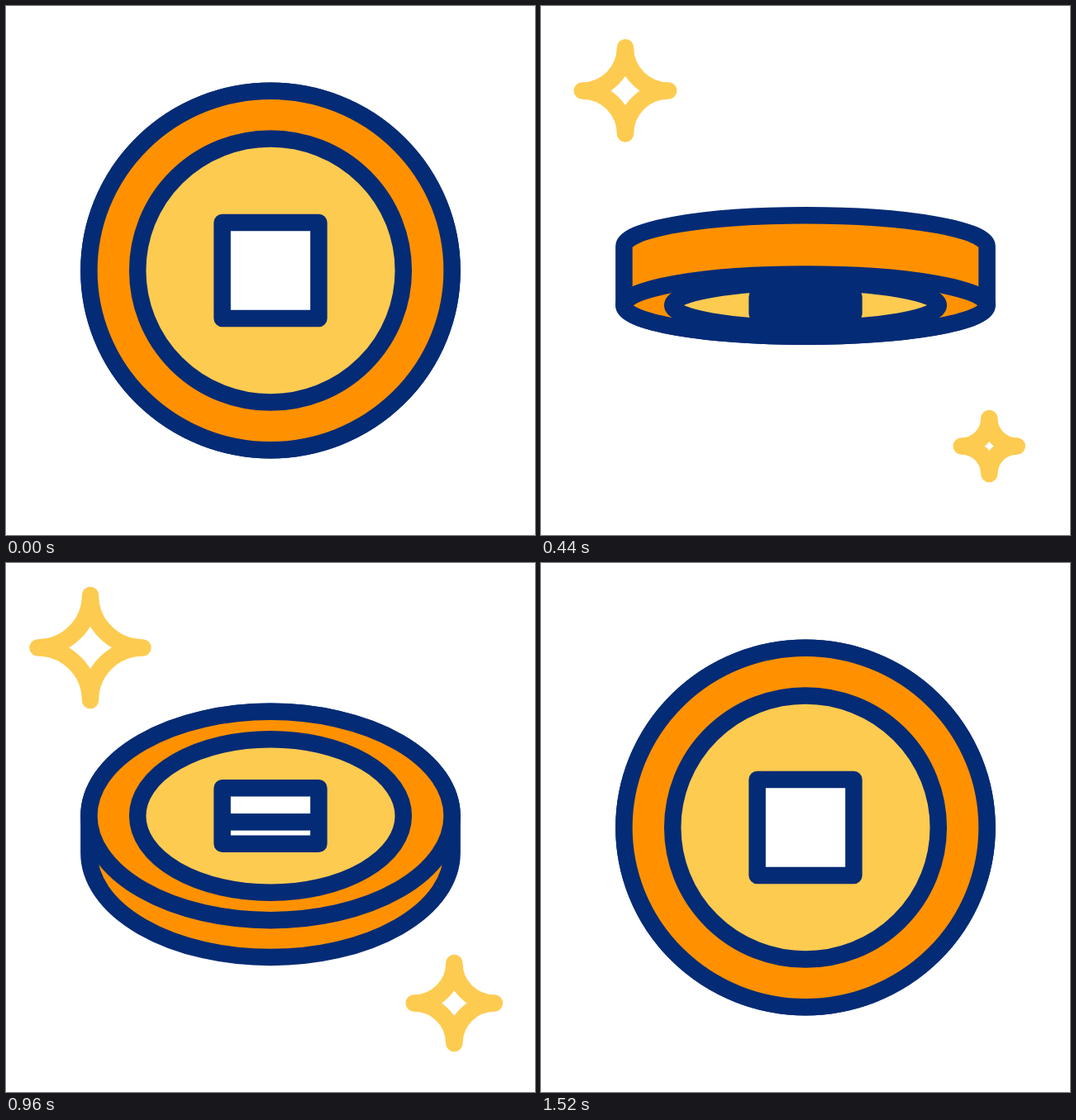
An HTML page with a canvas for the animation above (1900 ms loop, 640 by 640 pixels).

```html
<!DOCTYPE html>
<html lang="en">
<head>
<meta charset="utf-8">
<title>Spinning coin</title>
<style>
  html, body { margin: 0; width: 100%; height: 100%; overflow: hidden; background: #fff; }
  canvas { display: block; width: 100vw; height: 100vh; }
</style>
</head>
<body>
<canvas width="640" height="640"></canvas>
<script>
const ctx = document.querySelector('canvas').getContext('2d');
const NAVY = '#042b75', ORANGE = '#ff9100', YELLOW = '#fdcb50';
const LOOP = 1900, STEP = 20, CX = 320;
const RX = 219.6, RY = 217.2, INNER_RX = 160.8, INNER_RY = 159.6, HOLE = 58.4;

// Centres of the upper and lower rims: [time, upper y, lower y, openness]
const POSES = [
  [0, 320, 320, 1],
  [380, 283.8, 367.7, 0],
  [780, 330.4, 330.4, 1],
  [1100, 287, 366.7, 0],
  [1520, 320, 320, 1],
];
// Sparkle reach: [time, radius]
const SPARKLE = [[70, 0], [280, 67], [560, 41], [1040, 68], [1250, 0]];

const lerp = (a, b, u) => a + (b - a) * u;

function bezier(x1, y1, x2, y2, x) {
  const at = (a, b, s) => 3 * (1 - s) * (1 - s) * s * a + 3 * (1 - s) * s * s * b + s * s * s;
  let lo = 0, hi = 1;
  for (let i = 0; i < 24; i++) {
    const mid = (lo + hi) / 2;
    if (at(x1, x2, mid) < x) lo = mid; else hi = mid;
  }
  return at(y1, y2, lo);
}

function paint(fill, stroke) {
  if (fill) { ctx.fillStyle = fill; ctx.fill(); }
  ctx.strokeStyle = stroke;
  ctx.stroke();
}

function disc(y, rx, ry, fill) {
  ctx.beginPath();
  ctx.ellipse(CX, y, rx, ry, 0, 0, Math.PI * 2);
  paint(fill, NAVY);
}

function coin(t) {
  const time = Math.min(t, 1520);
  let i = 0;
  while (i < 3 && time >= POSES[i + 1][0]) i++;
  const a = POSES[i], b = POSES[i + 1];
  const u = (time - a[0]) / (b[0] - a[0]);
  const top = lerp(a[1], b[1], u), bottom = lerp(a[2], b[2], u);
  const open = bezier(.167, .13, i < 2 ? .66 : .6, 1, lerp(a[3], b[3], u));
  const k = Math.max(open, .001);
  const face = i % 2 ? bottom : top;

  ctx.beginPath();
  ctx.ellipse(CX, top, RX, RY * k, 0, Math.PI, Math.PI * 2);
  ctx.ellipse(CX, bottom, RX, RY * k, 0, 0, Math.PI);
  ctx.closePath();
  paint(ORANGE, NAVY);

  disc(face, RX, RY * k, ORANGE);
  disc(face, INNER_RX, INNER_RY * k, YELLOW);

  const h = 58 * k;
  ctx.beginPath();
  ctx.rect(CX - HOLE, face - h, HOLE * 2, h * 2);
  ctx.fillStyle = '#fff';
  ctx.fill();
  if (i === 2) {
    // far edge seen through the hole
    ctx.save();
    ctx.clip();
    ctx.fillStyle = NAVY;
    ctx.fillRect(CX - HOLE, face - h + 73 * u - 10.25, HOLE * 2, 20.5);
    ctx.restore();
  }
  ctx.beginPath();
  ctx.rect(CX - HOLE, face - h, HOLE * 2, h * 2);
  paint(null, NAVY);
}

function sparkle(x, y, t) {
  const i = SPARKLE.findIndex(([at], n) => n && t < at) - 1;
  if (i < 0 || t <= SPARKLE[0][0]) return;
  const [t0, r0] = SPARKLE[i], [t1, r1] = SPARKLE[i + 1];
  const r = lerp(r0, r1, (t - t0) / (t1 - t0));
  const q = Math.PI / 2;
  ctx.beginPath();
  ctx.arc(x + r, y - r, r, 2 * q, q, true);
  ctx.arc(x + r, y + r, r, 3 * q, 2 * q, true);
  ctx.arc(x - r, y + r, r, 0, -q, true);
  ctx.arc(x - r, y - r, r, q, 0, true);
  ctx.closePath();
  paint(null, YELLOW);
}

function draw(t) {
  ctx.fillStyle = '#fff';
  ctx.fillRect(0, 0, 640, 640);
  ctx.lineWidth = 20.5;
  ctx.lineJoin = ctx.lineCap = 'round';
  coin(t);
  sparkle(102, 102.4, t);
  sparkle(542.3, 532.5, t - 265);
}

let start;
function tick(now) {
  start ??= now;
  const t = Math.max(0, now - start) % LOOP;
  draw(Math.floor(t / STEP + .001) * STEP);
  requestAnimationFrame(tick);
}
draw(0);
requestAnimationFrame(tick);
</script>
</body>
</html>
```
